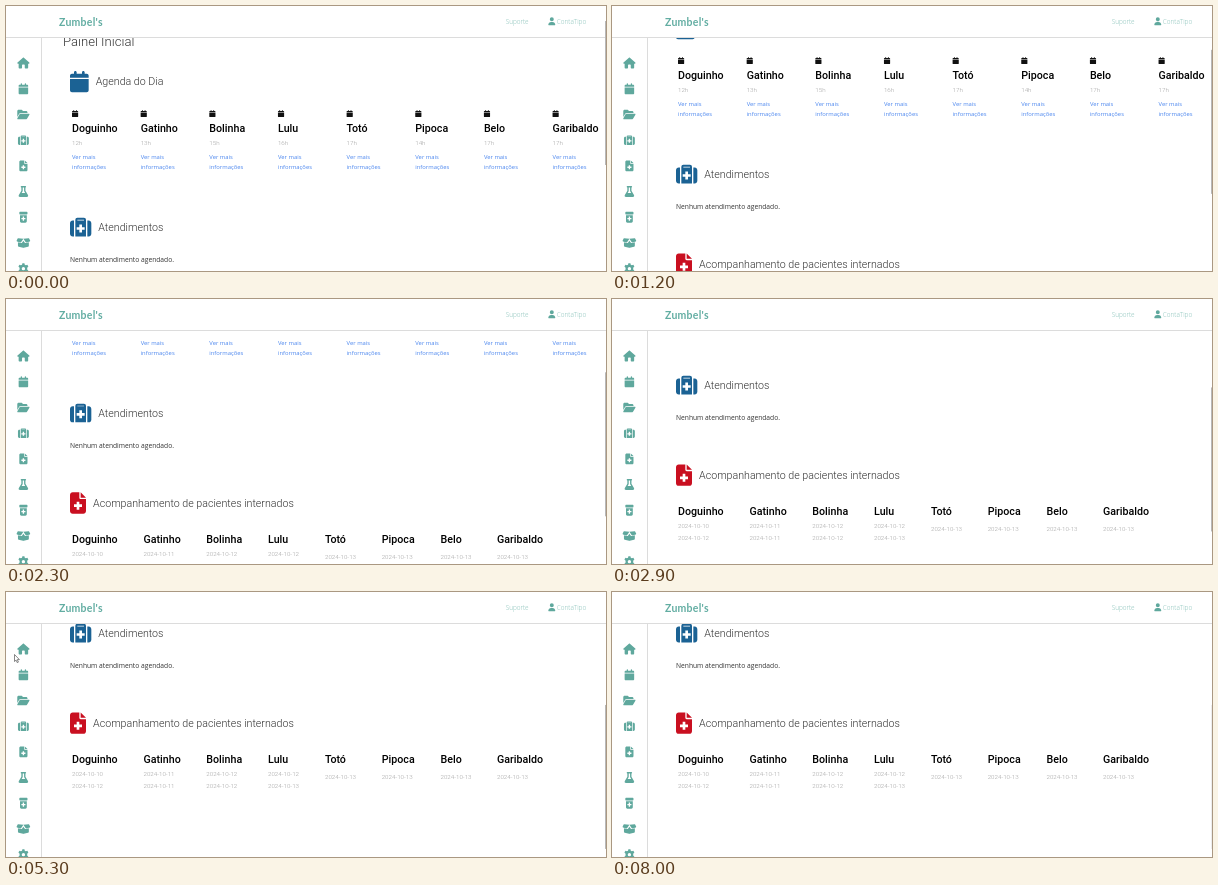
An HTML page that plays this animation: 600 by 265 pixels, repeating every 8.1 s.

```html
<!DOCTYPE html>
<html lang="pt">
<head>
<meta charset="utf-8">
<style>
  html, body { margin: 0; width: 100%; height: 100%; overflow: hidden; background: #fff; }
  svg { display: block; width: 600px; height: 265px; }
  text { font-family: Roboto, sans-serif; white-space: pre; }
  .title { font-size: 10.67px; font-weight: 300; fill: #333; }
  .name { font-size: 10.67px; font-weight: 500; fill: #000; }
  .thin { font-size: 6.2px; font-weight: 300; fill: #a2a2a2; }
  .link { font: 5.85px "Open Sans", sans-serif; fill: #4b86ee; }
  .note { font: 6.7px "Open Sans", sans-serif; fill: #333; }
  .nav { font: 300 6.4px "Open Sans", sans-serif; fill: #84bfb6; }
  .brand { font: 700 10.5px Lato, sans-serif; letter-spacing: .25px; fill: #62ada2; }
</style>
</head>
<body>
<svg viewBox="0 0 600 265">
  <defs><clipPath id="menuClip"><path d="M0 50h35v215H0z"/></clipPath></defs>
  <g id="page"></g>
  <g clip-path="url(#menuClip)"><g id="menu"></g></g>
  <path d="M0 0h600v31H0z" fill="#fff"/>
  <path d="M0 31.5h600M35.5 32v233" stroke="#dcdcdc"/>
  <g id="header"></g>
  <rect id="thumb" x="599" width="1" height="144" fill="#b8b8b8"/>
  <path id="cursor" d="M0 0v7l1.6-1.4 1.1 2.5 1.2-.5-1.1-2.5h2.1z" fill="#fff" stroke="#555" stroke-width=".7"/>
</svg>
<script>
const TEAL = '#5fa89d', BLUE = '#1b6294', RED = '#c90f20';
const CROSS = 'v2h-2v2h2v2h2v-2h2v-2h-2v-2z';

// Each icon: width in units (height is 16) and path
const icons = {
  home: [18, 'M18 8c0 .6-.45 1-1 1h-1v5.5c0 .8-.7 1.5-1.5 1.5H12c-.55 0-1-.45-1-1v-4c0-.55-.45-1-1-1H8c-.55 0-1 .45-1 1v4c0 .55-.45 1-1 1H3.5C2.7 16 2 15.3 2 14.5V9H1C.45 9 0 8.6 0 8c0-.3.1-.5.33-.75l8-7c.4-.33.95-.33 1.35 0l8 7c.2.2.3.45.32.75z'],
  calendar: [14, 'M4 0c.55 0 1 .45 1 1v1h4V1c0-.55.45-1 1-1s1 .45 1 1v1h1.5c.83 0 1.5.67 1.5 1.5V5H0V3.5C0 2.67.67 2 1.5 2H3V1c0-.55.45-1 1-1zM0 6h14v8.5c0 .83-.67 1.5-1.5 1.5h-11C.67 16 0 15.33 0 14.5z'],
  folder: [18, 'M2.8 7.1 0 11.9V3c0-1.1.9-2 2-2h3.7c.5 0 1 .2 1.4.6l.8.8c.4.4.9.6 1.4.6H13c1.1 0 2 .9 2 2v1H4.5c-.7 0-1.35.4-1.7 1zM3.6 7.5C3.8 7.2 4.1 7 4.5 7H17c.8 0 1.2.8.8 1.5l-3.5 6c-.2.3-.5.5-.9.5H1c-.8 0-1.2-.8-.9-1.5z'],
  medkit: [16, 'M3 3H2C.9 3 0 3.9 0 5v8c0 1.1.9 2 2 2h1zM13 3h1c1.1 0 2 .9 2 2v8c0 1.1-.9 2-2 2h-1zM4 3v-.5A1.5 1.5 0 0 1 5.5 1h5A1.5 1.5 0 0 1 12 2.5V15H4zM5.5 3h5v-.5h-5zM7 6' + CROSS],
  file: [12, 'M0 2C0 .9.9 0 2 0h5v4c0 .55.45 1 1 1h4v9c0 1.1-.9 2-2 2H2c-1.1 0-2-.9-2-2zM8 0l4 4H8zM5 7' + CROSS],
  flask: [14, 'M10 0H4C3.4 0 3 .4 3 1s.4 1 1 1v4.8L.3 13c-.8 1.4.1 3 1.7 3h10c1.6 0 2.5-1.6 1.7-3L10 6.8V2c.6 0 1-.4 1-1s-.4-1-1-1zM6 2h2v4.8c0 .4.1.7.3 1L9.6 10H4.4l1.3-2.2c.2-.3.3-.6.3-1z'],
  bottle: [12, 'M1 0h10c.55 0 1 .45 1 1v2c0 .55-.45 1-1 1H1C.45 4 0 3.55 0 3V1C0 .45.45 0 1 0zM1 5h10v9c0 1.1-.9 2-2 2H3c-1.1 0-2-.9-2-2zM5 7' + CROSS],
  box: [20, 'M1.8 1.2c.1-.2.3-.2.5-.2L10 2l7.7-1c.2 0 .4.1.5.2l1.7 3.3c.3.5 0 1.1-.5 1.2l-5.2 1.5c-.4.1-.8-.1-1-.4L10 2 6.8 6.8c-.2.3-.6.5-1 .4L.6 5.7c-.5-.1-.8-.7-.5-1.2zM10 4.9l1.5 2c.5.9 1.7 1.6 2.8 1.3L18 7.1v5c0 .7-.5 1.3-1.2 1.5l-6.3 1.6c-.3.1-.6.1-1 0l-6.3-1.6C2.5 13.4 2 12.8 2 12.1v-5l3.7 1.1c1.1.3 2.3-.4 2.8-1.3z'],
  gear: [16, 'M6.5 0h3l.5 2.2 1.6.9 2.2-.7 1.5 2.6-1.7 1.6v2.8l1.7 1.6-1.5 2.6-2.2-.7-1.6.9-.5 2.2h-3L6 13.8l-1.6-.9-2.2.7L.7 11l1.7-1.6V6.6L.7 5l1.5-2.6 2.2.7L6 2.2zM8 5.5a2.5 2.5 0 1 0 0 5 2.5 2.5 0 0 0 0-5z'],
  user: [14, 'M7 8a4 4 0 1 0 0-8 4 4 0 0 0 0 8zM5.6 9.5h2.8c3.1 0 5.6 2.5 5.6 5.6 0 .5-.4.9-.9.9H.9c-.5 0-.9-.4-.9-.9 0-3.1 2.5-5.6 5.6-5.6z']
};

const $ = id => document.getElementById(id);
const text = (x, y, cls, str) => `<text x="${x}" y="${y}" class="${cls}">${str}</text>`;
const icon = (name, x, y, scale, color) =>
  `<path d="${icons[name][1]}" fill="${color}" fill-rule="evenodd" transform="translate(${x} ${y}) scale(${scale})"/>`;

const pets = ['Doguinho', 'Gatinho', 'Bolinha', 'Lulu', 'Totó', 'Pipoca', 'Belo', 'Garibaldo'];
const hours = [12, 13, 15, 16, 17, 14, 17, 17];
const stayX = [66, 137.5, 200.3, 262, 319, 375.7, 434.5, 491];
const stayDays = [[10, 12], [11, 11], [12, 12], [12, 13], [13], [13], [13], [13]];

const agenda = pets.map((pet, i) => {
  const x = 66 + 68.65 * i;
  return icon('calendar', x, 104, .44, '#111') + text(x, 125.5, 'name', pet) +
    text(x, 138.6, 'thin', hours[i] + 'h') +
    text(x, 153, 'link', 'Ver mais') + text(x, 163.2, 'link', 'informações');
}).join('');

const stays = pets.map((pet, i) => text(stayX[i], 351, 'name', pet) +
  stayDays[i].map((day, row, all) =>
    text(stayX[i], (all.length > 1 ? 363.8 : 366.8) + 12.5 * row, 'thin', '2024-10-' + day)).join('')
).join('');

$('page').innerHTML =
  `<text x="57" y="39.8" class="title" style="font-size:13.1px">Painel Inicial</text>` +
  icon('calendar', 64, 65, 1.333, BLUE) + text(89.7, 79, 'title', 'Agenda do Dia') + agenda +
  icon('medkit', 64, 210.5, 1.333, BLUE) + text(92.3, 225, 'title', 'Atendimentos') +
  text(64, 255.8, 'note', 'Nenhum atendimento agendado.') +
  icon('file', 64, 300.5, 1.333, RED) +
  text(87, 315, 'title', 'Acompanhamento de pacientes internados') + stays;

$('menu').innerHTML = ['home', 'calendar', 'folder', 'medkit', 'file', 'flask', 'bottle', 'box', 'gear']
  .map((name, i) => icon(name, 17.4 - icons[name][0] * .34, 51.6 + 25.7 * i, .68, TEAL)).join('');

$('header').innerHTML = text(53, 19.5, 'brand', "Zumbel's") + text(499.7, 18, 'nav', 'Suporte') +
  icon('user', 542.3, 11.3, .5, TEAL) + text(550.8, 18, 'nav', 'ContaTipo');

// Linear interpolation through [time, value] points
function track(t, points) {
  const i = points.findIndex(p => p[0] >= t);
  if (i < 0) return points[points.length - 1][1];
  if (i === 0) return points[0][1];
  const [t0, a] = points[i - 1], [t1, b] = points[i];
  return a + (b - a) * (t - t0) / (t1 - t0);
}

const move = (id, x, y) => $(id).setAttribute('transform', `translate(${x} ${y})`);

function draw(now) {
  const t = Math.floor(now % 8100 / 100) * 100;
  const scroll = track(t, [[0, 0], [1200, 53], [1800, 84], [2900, 135], [3700, 180]]);
  move('page', 0, -scroll);
  move('thumb', 0, 15 + scroll * .544);
  $('thumb').setAttribute('opacity', track(t, [[7500, 1], [8000, .25]]));
  move('menu', 0, -track(t, [[5400, 0], [6200, 20], [7500, 20], [8000, 0]]));
  move('cursor',
    track(t, [[4600, 22], [5300, 8.5], [7500, 8.5], [8000, -8]]),
    track(t, [[4600, -10], [5300, 62.5]]));
  requestAnimationFrame(draw);
}
draw(0);
</script>
</body>
</html>
```
